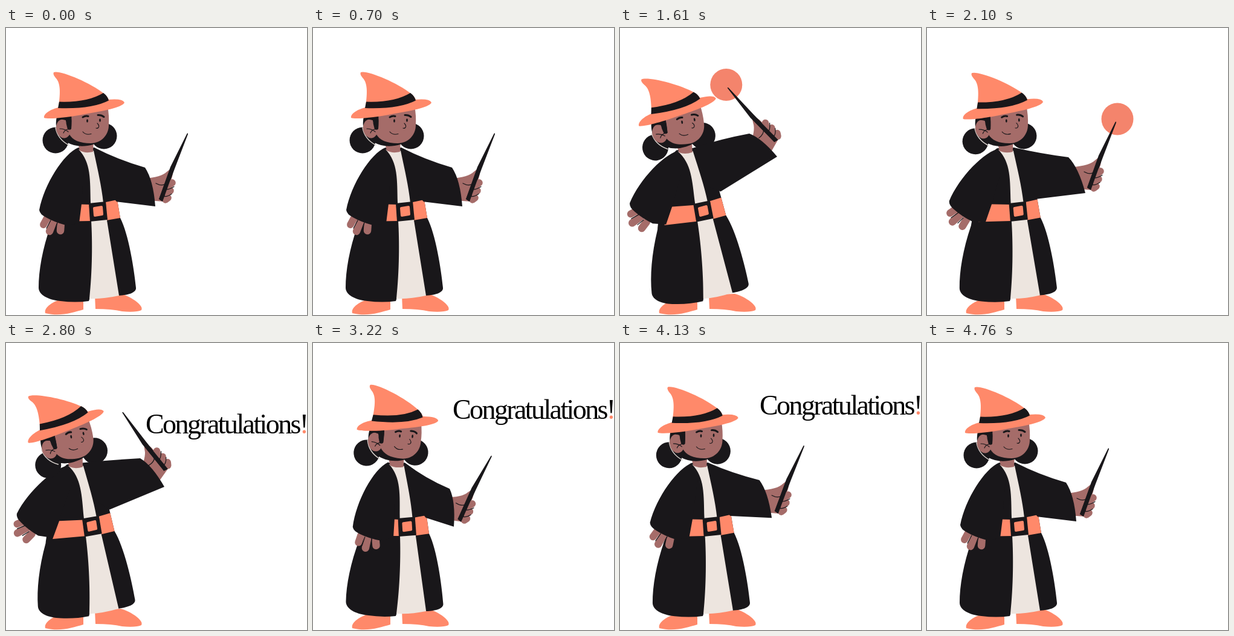
Animation of 498 by 473 pixels, one loop 4.97 s. Source, as an HTML page with a canvas:

```html
<!DOCTYPE html>
<html lang="en">
<head>
<meta charset="utf-8">
<title>Congratulations</title>
<style>
html, body { margin: 0; width: 100%; height: 100%; overflow: hidden; background: #fff; }
canvas { display: block; }
</style>
</head>
<body>
<canvas id="stage" width="498" height="473"></canvas>
<script>
const ctx = document.getElementById('stage').getContext('2d');
const LOOP = 4970, STEP = 70, RAD = Math.PI / 180;
const BLACK = '#19171a', ORANGE = '#ff896a', CREAM = '#ede5df';
const SKIN = '#a56c69', BALL = '#f4846c';
const FOOT = [140, 448], NECK = [132, 197], SHOULDER = [118, 215], WRIST = [80, 316];

// lean, head tilt, left arm swing, wand x, y, turn, cuff top x, y, cuff bottom x, y
const rest = [0, 0, 0, 255, 284, 0, 230, 230, 247, 294];
const crouch = [2.75, 6.25, -11.75, 235, 315, 22, 229, 254, 225, 321];
const windUp = [-5.7, -3.3, 17.4, 258, 187, -64.4, 214, 174, 260, 212];
const forward = [-.5, -.8, 12.5, 267, 265, 0, 234, 213, 262, 272];
const thrust = [.5, 1, 9, 272, 267, 5, 238, 217, 265, 275];
const raise = [-4, -8, 20, 264, 210, -59, 222, 190, 262, 237];
const recover = [1, 3.5, -1, 262, 284, -1, 235, 231, 252, 294];
const sway = [-.2, -.3, 4.2, 259, 278, 0, 231, 225, 252, 287];
const nod = [0, 4, 0, 255, 284, 2, 230, 230, 247, 294];

const keys = [
  [0, rest], [700, rest], [1120, crouch], [1190, crouch], [1610, windUp], [1750, windUp],
  [2100, forward], [2240, thrust], [2730, raise], [2800, raise], [3400, crouch],
  [3640, recover], [4030, sway], [4400, nod], [4760, rest], [LOOP, rest]
];

const clamp = v => Math.max(0, Math.min(1, v));
const ramp = (t, a, b) => clamp((t - a) / (b - a));
const smooth = p => p * p * (3 - 2 * p);

// Slope at key i, flat where the value turns around
function slope(i, c) {
  if (i < 1 || i > keys.length - 2) return 0;
  const [[t0, a], [t1, b], [t2, d]] = keys.slice(i - 1, i + 2);
  const before = (b[c] - a[c]) / (t1 - t0), after = (d[c] - b[c]) / (t2 - t1);
  return before * after <= 0 ? 0 : 2 * before * after / (before + after);
}

function poseAt(t) {
  let i = 0;
  while (i < keys.length - 2 && t >= keys[i + 1][0]) i++;
  const [t0, a] = keys[i], [t1, b] = keys[i + 1];
  const span = t1 - t0, p = (t - t0) / span, q = 1 - p;
  return a.map((v, c) => v + (b[c] - v) * smooth(p)
    + span * p * q * (q * slope(i, c) - p * slope(i + 1, c)));
}

function fill(color, d) {
  ctx.fillStyle = color;
  ctx.fill(new Path2D(d));
}

function line(d, width = 1.2, color = BLACK) {
  ctx.strokeStyle = color;
  ctx.lineWidth = width;
  ctx.lineCap = ctx.lineJoin = 'round';
  ctx.stroke(new Path2D(d));
}

function oval(color, x, y, rx, ry = rx, turn = 0) {
  ctx.fillStyle = color;
  ctx.beginPath();
  ctx.ellipse(x, y, rx, ry, turn, 0, 7);
  ctx.fill();
}

function turned([x, y], degrees, draw) {
  ctx.save();
  ctx.translate(x, y);
  ctx.rotate(degrees * RAD);
  ctx.translate(-x, -y);
  draw();
  ctx.restore();
}

function around([cx, cy], degrees, x, y) {
  const c = Math.cos(degrees * RAD), s = Math.sin(degrees * RAD);
  return [cx + (x - cx) * c - (y - cy) * s, cy + (x - cx) * s + (y - cy) * c];
}

function shoes() {
  fill(ORANGE, 'M65 470C62 460 80 449 100 444L128 446V464C110 469 90 476 65 470Z');
  fill(ORANGE, 'M147 440L148 463Q175 463 192 467Q215 469 224 465C229 458 208 443 190 438Z');
}

function robe() {
  fill(BLACK, `M118 198C95 215 82 290 74 325C60 365 54 400 54 428C54 440 70 448 90 450Q115 453 137 450
    L141 438L187 441C203 440 216 436 215 428C212 398 203 340 189 313L184 283L172 215L146 197Z`);
  fill(ORANGE, 'M99 290L140 291V318L86 319ZM165 287L184 283L189 313L166 317Z');
}

function leftHand() {
  line('M68 313L62 324', 12, SKIN);
  line('M79 317L72 335M91 321L90 334', 12.5, SKIN);
  line('M74 317L67 330M85 321L81 333');
}

function leftArm(swing) {
  turned(WRIST, swing * 1.2, leftHand);
  fill(BLACK, `M120 197C95 207 63 258 55 300Q56 307 66 312Q80 320 99 325
    L121 322L125 290Q128 240 132 205Z`);
}

function front() {
  fill(CREAM, `M120 200Q135 207 145 202C152 235 158 260 161 288L167 317L187 441Q160 447 138 446
    C143 400 143 350 141 318L140 288C139 250 141 222 120 200Z`);
  fill(BLACK, 'M137 289L165 286L168 316L139 319Z');
  fill(ORANGE, 'M146 295L158 293Q160 293 160 295L161 307Q161 309 159 309L147 311Q145 311 145 309L144 297Q144 295 146 295Z');
  fill(SKIN, 'M118 186H145L144 204Q131 207 122 202Z');
}

function head(sag, eyes) {
  oval(BLACK, 82 + sag, 185 + sag, 21.5);
  oval(BLACK, 162 + sag, 178 + sag, 21.5);
  fill(BLACK, 'M84 146C80 165 86 181 100 188Q116 197 135 194Q150 192 155 184L160 140Z');
  line('M82 164Q85 183 104 193', 1.5, '#d9d2cd');
  fill(SKIN, 'M104 138L168 128Q171 145 170 160C170 176 158 190 140 190C122 190 110 185 104 174Z');
  oval(SKIN, 95, 166, 12, 15.5, -.2);
  fill(BLACK, 'M84 150Q92 150 99 152Q99 163 102 168Q106 169 108 166Q109 152 107 138L86 142Z');
  oval(SKIN, 95, 166, 11, 14, -.2);
  fill(BLACK, 'M99 140H108Q109 155 108 166Q106 169 102 167Q99 158 99 150Z');
  line('M89 166Q97 166 103 171M95 173Q97 168 102 167');
  ctx.globalAlpha = eyes;
  oval(BLACK, 134.5, 153, 1.4, 2.8);
  oval(BLACK, 155.5, 152, 1.4, 2.8);
  ctx.globalAlpha = 1;
  line('M127 147Q132 144 136 145.500M152 143.500Q158 143 162 146.500', 3);
  line('M151 157Q155 161 153 164Q151 166 149 165M127 171Q132 177 141 174.500', 1.1);
  fill(ORANGE, `M79 73C88 69 138 89 162 108Q168 113 170 118Q193 116 196 123C192 131 160 137 130 142
    C105 147 70 151 63 148C62 141 74 134 87 131C89 112 92 92 82 82Q77 76 79 73Z`);
  fill(BLACK, 'M88 121.500Q135 123 161 107Q168 112 170 119.500Q142 134 86 132Z');
}

function rightSleeve(lean, [tx, ty, bx, by]) {
  const [sx, sy] = around(FOOT, lean, 146, 197);
  const [px] = around(FOOT, lean, 183, 284);
  const [ix, iy] = around(FOOT, lean, 160, 260);
  const py = 226 + by * .205; // the armpit lifts with the cuff
  const dx = bx - tx, dy = by - ty;
  const topX = (sx + tx) / 2 - 2, topY = sy + (ty - sy) * .62;
  fill(BLACK, `M${sx} ${sy}Q${topX} ${topY} ${tx} ${ty}
    Q${tx + dx * .35 + dy * .12} ${ty + dy * .35 - dx * .12} ${bx} ${by}L${px} ${py}L${ix} ${iy}Z`);
}

function wandHand(x, y, turn) {
  ctx.save();
  ctx.translate(x, y);
  ctx.rotate(turn * RAD);
  fill(SKIN, 'M-26 -36Q2 -38 11 -47Q21 -56 21 -48Q21 -38 17 -32L6 2L-22 0Z');
  line('M-7 -28Q2 -23 9 -27');
  fill(BLACK, 'M-2 -2L17 -55L44.500 -110Q46 -112 46 -109L24 -52L4 2Z');
  line('M9 -1L13 -4M12 -13L17 -16M15 -25L20 -29', 11.5, SKIN);
  line('M8 -18Q14 -17 23 -22.500M5 -7Q11 -5 19 -10.500');
  fill(BLACK, 'M-2 -2L14 -45L21 -45L4 2Z');
  ctx.restore();
}

function ball(t, x, y, turn) {
  const fade = ramp(t, 2240, 2400), size = smooth(ramp(t, 1300, 1540));
  if (!size || fade === 1) return;
  const [bx, by] = around([x, y], turn, x + 46, y - 111);
  ctx.globalAlpha = 1 - fade;
  oval(BALL, bx + (turn < -30 ? -2 : 2), by - 4, 26.5 * size * (1 + fade * .2));
  ctx.globalAlpha = 1;
}

function greeting(t) {
  const alpha = ramp(t, 2380, 2590) * (1 - ramp(t, 4550, 4740));
  if (!alpha) return;
  const word = 'Congratulations', y = 163 - 45 * smooth(ramp(t, 2380, 3500));
  ctx.globalAlpha = alpha;
  ctx.font = '46px "Liberation Serif", "Times New Roman", serif';
  ctx.letterSpacing = '-2.6px';
  ctx.fillStyle = '#000';
  ctx.fillText(word, 231, y);
  const mark = ctx.createLinearGradient(0, y - 9, 0, y - 8);
  mark.addColorStop(0, '#000');
  mark.addColorStop(1, ORANGE);
  ctx.fillStyle = mark;
  ctx.fillText('!', 231 + ctx.measureText(word).width, y);
  ctx.globalAlpha = 1;
}

function render(t) {
  const [lean, tilt, swing, x, y, turn, ...cuff] = poseAt(t);
  const blinking = [1120, 3640].some(b => Math.abs(t - b) < 105);
  const sag = Math.max(0, -tilt) * .7;
  ctx.fillStyle = '#fff';
  ctx.fillRect(0, 0, 498, 473);
  shoes();
  turned(FOOT, lean, () => {
    robe();
    turned(SHOULDER, swing, () => leftArm(swing));
    front();
    turned(NECK, tilt, () => head(sag, blinking ? .35 : 1));
  });
  ball(t, x, y, turn);
  wandHand(x, y, turn);
  rightSleeve(lean, cuff);
  greeting(t);
}

const start = performance.now();
function tick() {
  const t = (performance.now() - start) % LOOP;
  render(Math.floor(t / STEP) * STEP);
  requestAnimationFrame(tick);
}
tick();
</script>
</body>
</html>
```
